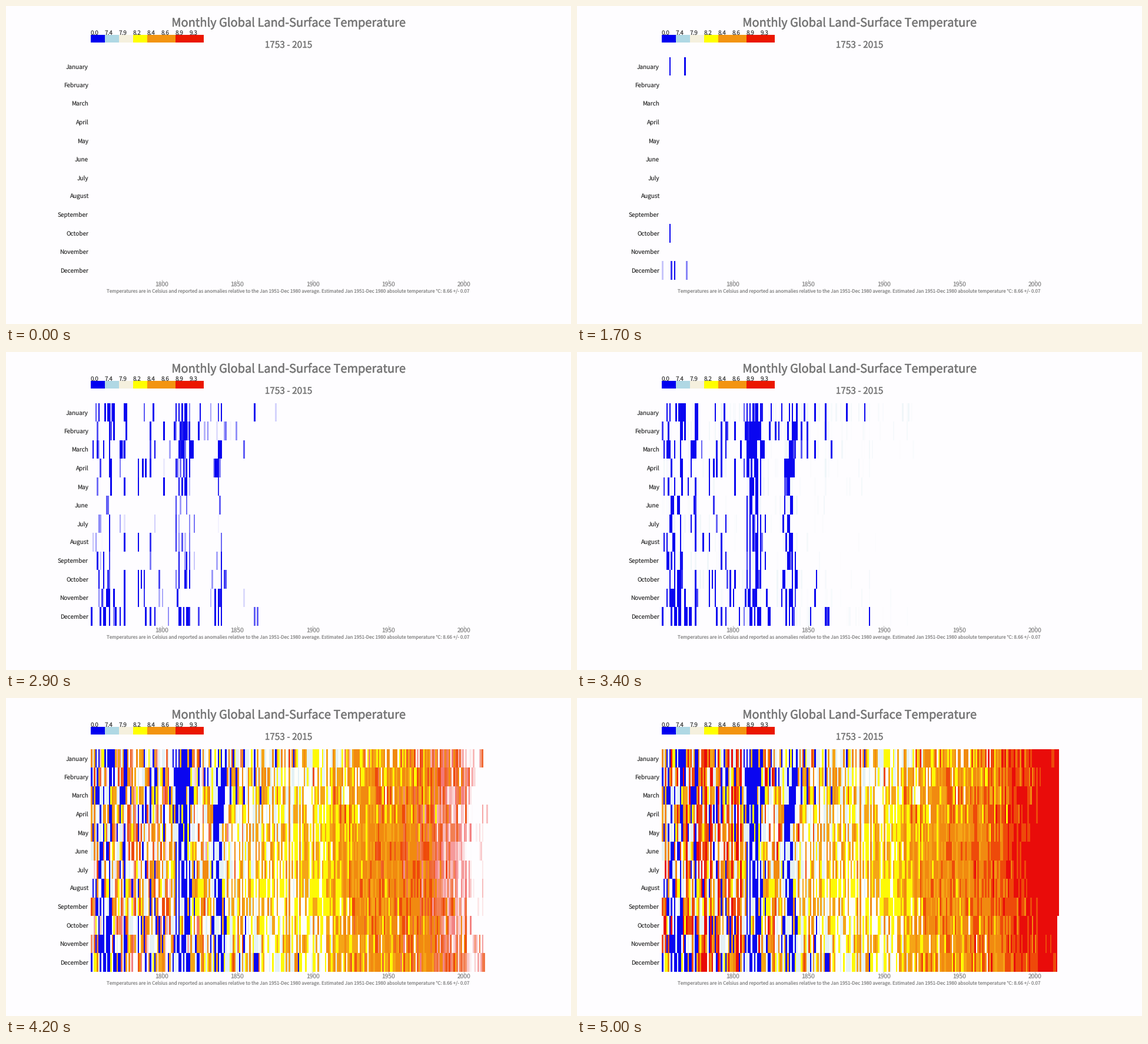
These frames come from a looping animation (960 by 540 pixels, 5100 ms). A matplotlib script:

```python
import numpy as np
import matplotlib
import matplotlib.pyplot as plt
from matplotlib.animation import FuncAnimation
from matplotlib.patches import Rectangle
from matplotlib.patheffects import withStroke

matplotlib.rcParams["font.family"] = ["Noto Sans CJK JP", "DejaVu Sans"]
matplotlib.rcParams["text.hinting"] = "none"

W, H, DPI = 960, 540, 100
STEP, FRAMES, FADE = 100, 51, 300  # ms, count, ms
FIRST, LAST = 1753, 2015
YEARS = np.arange(FIRST, LAST + 1)
LEFT, RIGHT, TOP, BOTTOM = 144, 819, 87, 465
ROW = (BOTTOM - TOP) / 12
GREY, PALE, DARK, PAPER = "#777777", "#868686", "#383838", "#fefdff"

MONTHS = ["January", "February", "March", "April", "May", "June", "July",
          "August", "September", "October", "November", "December"]
LIMITS = [7.4, 7.9, 8.2, 8.4, 8.6, 8.9, 9.3]
LEGEND = ["#0000f0", "#b0d8e4", "#f5f0de", "#ffff00",
          "#f39410", "#f39410", "#eb1700", "#eb1700"]
# The pale bands are nearly white inside the chart.
CELLS = ["#0a06f0", "#e4f1f5", "#fefefa", "#fdf905",
         "#f5a516", "#f18a10", "#ee4a0a", "#e90c0a"]

TREND = [(1753, 8.2), (1800, 8.5), (1850, 8.1), (1890, 8.1), (1930, 8.6),
         (1970, 8.75), (1998, 9.4), (2015, 10.0)]
DIPS = [(1764, 5, 0.6), (1813, 5, 1.2), (1837, 4, 0.9)]  # year, width, depth
# Coldest cells in order: month, years since the first
RECORDS = [(9, 5), (11, 8), (0, 5), (0, 15), (11, 6), (11, 16), (11, 0)]
# Time in ms by which so many cells have turned up
COUNTS, TIMES = [1, 2, 3, 8, 190], [300, 800, 1300, 1800, 2900]
FREEZE_END = 3330


def temperatures(rng):
    season = np.cos(2 * np.pi * np.arange(12) / 12)[:, None]
    mean = np.interp(YEARS, *zip(*TREND)) - 0.1 * season
    for year, width, depth in DIPS:
        mean = mean - depth * np.exp(-((YEARS - year) / width) ** 2)
    spread = 0.26 + 0.75 * np.exp(-((YEARS - FIRST) / 90) ** 3)
    noise = (0.85 * rng.normal(size=(12, len(YEARS)))
             + 0.5 * rng.normal(size=len(YEARS)))
    temp = mean + noise * spread * (1 + 0.3 * season)
    for i, cell in enumerate(RECORDS):
        temp[cell] = 1 + 0.2 * i
    return temp


def start_times(temp):
    """Cells turn up from the coldest, few at first, to the warmest."""
    rank = temp.ravel().argsort().argsort().reshape(temp.shape) + 1
    gap = temp - LIMITS[0]
    counts = COUNTS + [np.sum(gap < 0)]
    cold = np.interp(np.log(rank), np.log(counts), TIMES + [FREEZE_END])
    start = np.where(gap < 0, cold, FREEZE_END + 420 * gap)
    start = np.minimum(start, 4800)
    start[9:, -1] = np.inf  # the last year stops in September
    return start


def label(x, y, text, px, color=GREY, ha="center", stroke=0):
    t = ax.text(x, y, text, fontsize=px * 72 / DPI, color=color, ha=ha,
                va="baseline")
    if stroke:
        t.set_path_effects([withStroke(linewidth=stroke, foreground=color)])


temp = temperatures(np.random.default_rng(FIRST))
start = start_times(temp)
rgba = np.array([matplotlib.colors.to_rgba(c) for c in CELLS])
pixels = rgba[np.digitize(temp, LIMITS)]

fig = plt.figure(figsize=(W / DPI, H / DPI), dpi=DPI, facecolor=PAPER)
ax = fig.add_axes([0, 0, 1, 1])
ax.axis("off")
chart = ax.imshow(pixels, extent=(LEFT, RIGHT, BOTTOM, TOP), aspect="auto",
                  interpolation="nearest")
ax.set_xlim(0, W)
ax.set_ylim(H, 0)

label(480, 35, "Monthly Global Land-Surface Temperature", 20, stroke=0.35)
label(480, 71, f"{FIRST} - {LAST}", 15.4, stroke=0.25)
for i, (color, value) in enumerate(zip(LEGEND, [0.0] + LIMITS)):
    x = LEFT + 24 * i
    ax.add_patch(Rectangle((x, 49), 24, 12.5, color=color, lw=0))
    label(x, 49, f"{value:.1f}", 10, DARK, "left")
for i, name in enumerate(MONTHS):
    label(140, TOP + 19.2 + ROW * i, name, 10, DARK, "right")
for year in range(1800, 2001, 50):
    x = LEFT + (year - FIRST) * (RIGHT - LEFT) / len(YEARS)
    ax.plot([x, x], [BOTTOM, BOTTOM + 3], color="#aaaaaa", lw=0.6)
    label(x, 476.6, str(year), 10.3, PALE)
label(479.7, 487,
      "Temperatures are in Celsius and reported as anomalies relative to the "
      "Jan 1951-Dec 1980 average. Estimated Jan 1951-Dec 1980 absolute "
      "temperature \u2103: 8.66 +/- 0.07", 8, PALE)


def draw(frame):
    now = frame * STEP
    pixels[..., 3] = np.clip((now + STEP - start) / FADE, 0, 1)
    chart.set_data(pixels)
    return [chart]


anim = FuncAnimation(fig, draw, frames=FRAMES, interval=STEP, repeat=True)
plt.show()
```
